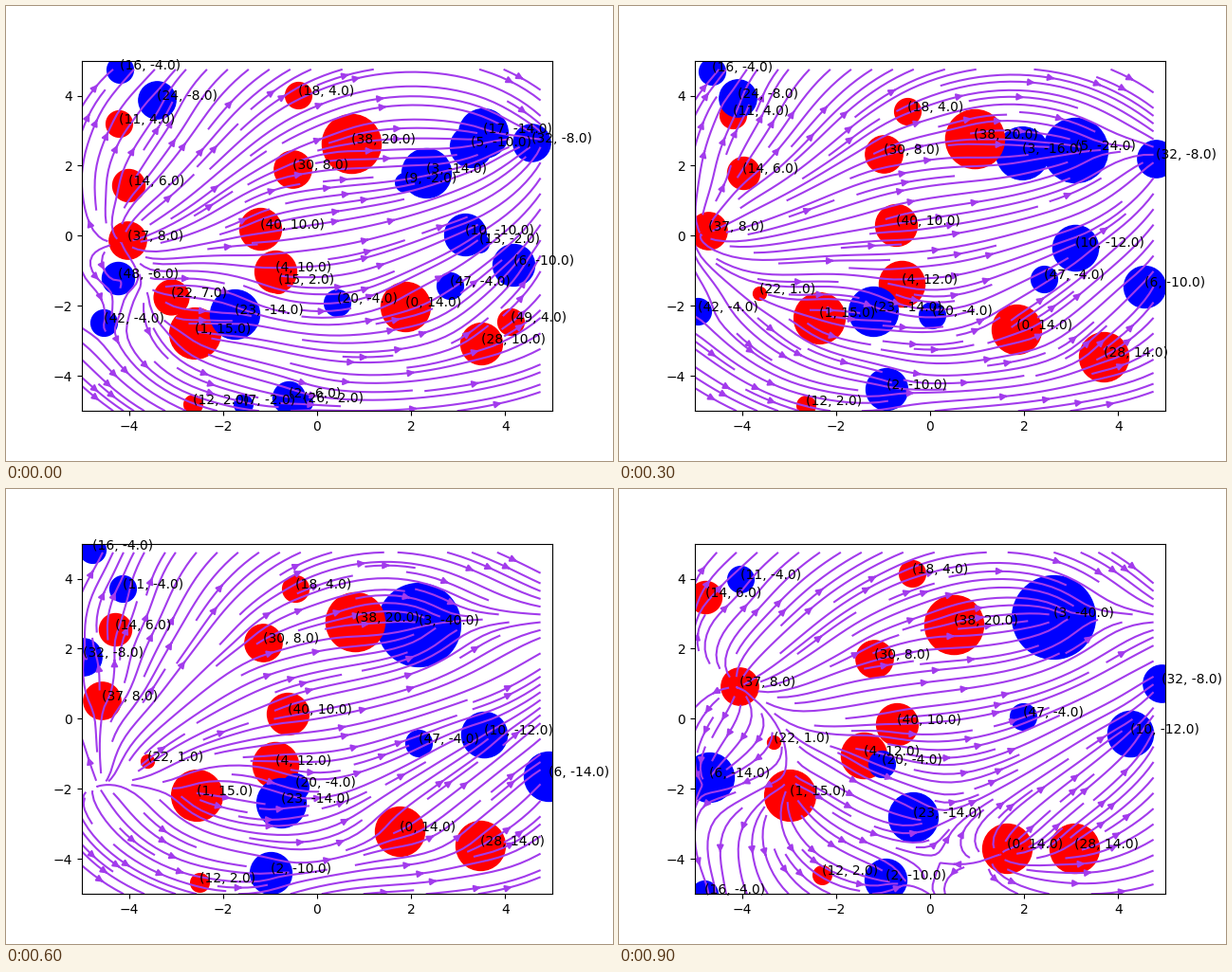
A matplotlib script that plays this animation: 640 by 480 pixels, repeating every 1000 ms.

```python
import numpy as np
import matplotlib.pyplot as plt
from matplotlib.animation import FuncAnimation

FRAMES, INTERVAL = 10, 100
LAST = FRAMES - 1
HALF = 5.0                       # periodic box, -HALF to HALF each way
PURPLE = "#A23BEC"


def to_box(points):
    """Stage pixels to box coordinates."""
    x, y = np.array(points, float).T
    return np.array([(x - 80) / 49.6 - HALF, HALF - (y - 57.6) / 36.96])


class Charge:
    """Drifts from start to end, bending once at `turn` if a middle point
    is given, and joins the charge `into` after the frame `until`."""

    def __init__(self, number, charge, *points, turn=4, until=LAST, into=None):
        self.number, self.own = number, float(charge)
        self.until, self.into = until, into
        self.times = (0, turn, until) if len(points) == 3 else (0, until)
        self.times = self.times[:len(points)]
        self.path = np.unwrap(to_box(points), period=2 * HALF)

    def position(self, frame):
        spot = np.array([np.interp(frame, self.times, p) for p in self.path])
        return (spot + HALF) % (2 * HALF) - HALF

    def charge(self, frame):
        return self.own + sum(c.charge(frame) for c in charges
                              if c.into == self.number and frame > c.until)


charges = [
    Charge(0, 14, (421, 317), (419, 349), (409, 379)),
    Charge(1, 15, (199, 345), (215, 323), (180, 323)),
    Charge(2, -6, (298, 413), (277, 401), (281, 412)),
    Charge(3, -14, (443, 176), (419, 148), (458, 135)),
    Charge(4, 10, (284, 280), (302, 297), (258, 281)),
    Charge(5, -10, (490, 148), (478, 153), (410, 149), until=5, into=3),
    Charge(6, -10, (535, 273), (560, 303), (95, 304)),
    Charge(7, -2, (250, 420), (251, 58), until=2, into=2),
    Charge(9, -2, (420, 186), (435, 183), until=1, into=3),
    Charge(10, -10, (484, 241), (480, 259), (539, 258)),
    Charge(11, 4, (119, 124), (120, 112), (128, 95)),
    Charge(12, 2, (197, 420), (197, 421), (214, 407)),
    Charge(13, -2, (499, 250), until=0, into=10),
    Charge(14, 6, (129, 189), (131, 171), (91, 114)),
    Charge(15, 2, (287, 293), until=0, into=4),
    Charge(16, -4, (120, 67), (91, 69), (90, 427)),
    Charge(17, -14, (503, 134), until=0, into=5),
    Charge(18, 4, (308, 94), (303, 116), (309, 89)),
    Charge(20, -4, (349, 313), (324, 330), (277, 290)),
    Charge(22, 7, (174, 307), (139, 301), (163, 267)),
    Charge(23, -14, (241, 325), (277, 321), (310, 346)),
    Charge(24, -8, (159, 99), (103, 96), until=5, into=11),
    Charge(26, -2, (313, 418), until=0, into=2),
    Charge(28, 10, (501, 356), (514, 374), (480, 379)),
    Charge(30, 8, (302, 172), (272, 150), (269, 179)),
    Charge(32, -8, (554, 144), (85, 183), (572, 205), turn=7),
    Charge(37, 8, (128, 247), (83, 233), (127, 208)),
    Charge(38, 20, (364, 145), (378, 138), (353, 143)),
    Charge(40, 10, (268, 235), (300, 230), (293, 248)),
    Charge(42, -4, (103, 334), (573, 318), until=4, into=6),
    Charge(47, -4, (468, 295), (441, 286), (426, 240)),
    Charge(48, -6, (118, 287), (155, 287), until=2, into=22),
    Charge(49, 4, (532, 333), (511, 334), until=1, into=28),
]

fig, ax = plt.subplots(figsize=(6.4, 4.8), dpi=100)
axis = np.arange(-HALF, HALF, 0.25)
X, Y = np.meshgrid(axis, axis)


def draw(frame):
    ax.clear()
    ex, ey = np.zeros_like(X), np.zeros_like(Y)
    for c in charges:
        if frame > c.until:
            continue
        q, (x, y) = c.charge(frame), c.position(frame)
        dx, dy = X - x, Y - y
        r = np.hypot(dx, dy) + 1e-9
        ex += q * dx / r
        ey += q * dy / r
        ax.scatter(x, y, s=100 * abs(q), c="red" if q > 0 else "blue")
        ax.text(x, y, f"({c.number}, {q})")
    ax.streamplot(X, Y, ex, ey, color=PURPLE, density=1.5)
    ax.set(xlim=(-HALF, HALF), ylim=(-HALF, HALF))


anim = FuncAnimation(fig, draw, frames=FRAMES, interval=INTERVAL, repeat=True)
plt.show()
```
